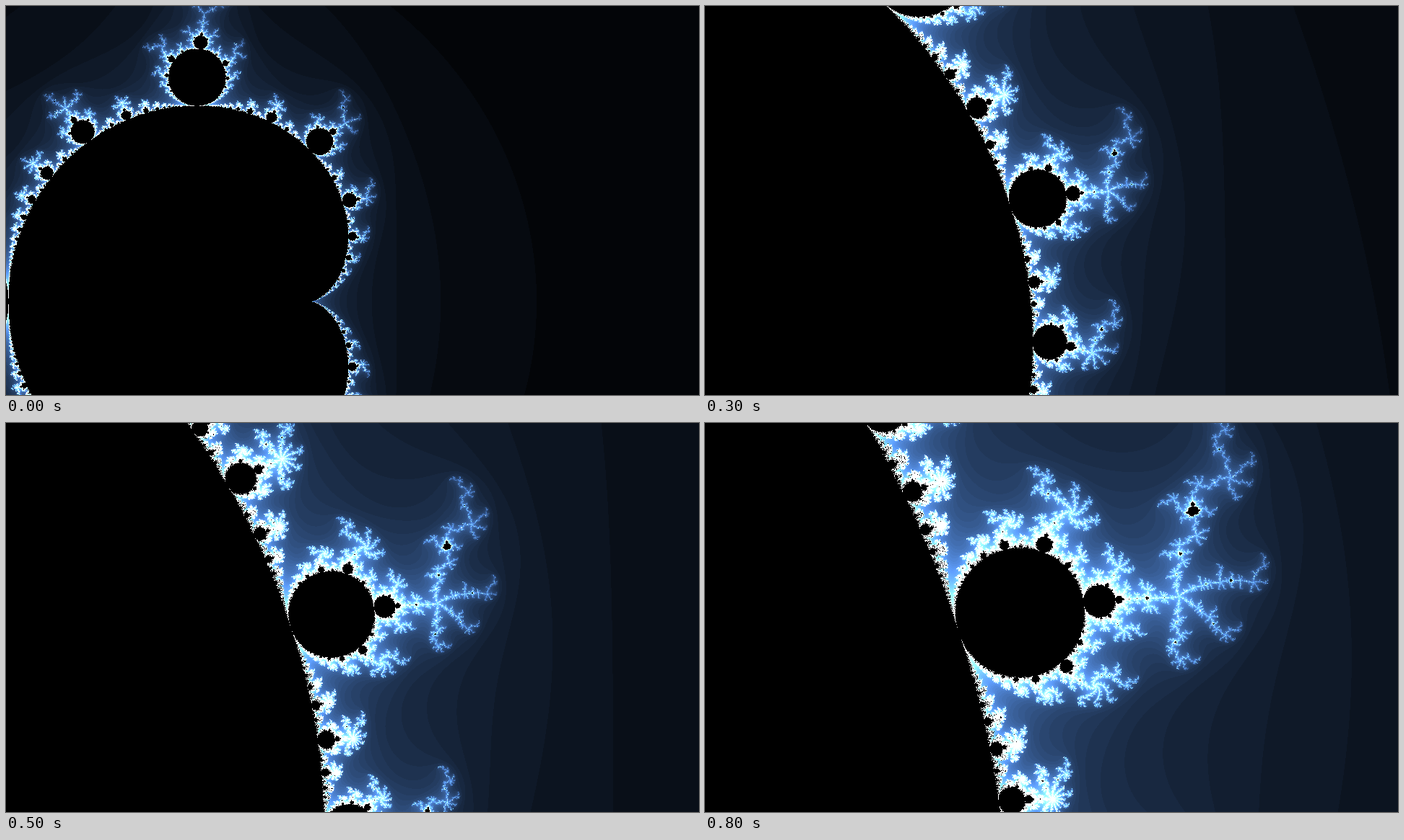
Write an HTML page with a canvas that moves like this. It is 960 by 540 pixels and loops after 900 ms.

```html
<!DOCTYPE html>
<html lang="en">
<head>
<meta charset="utf-8">
<title>Stepped fractal zoom</title>
<style>
  html, body { margin: 0; width: 100%; height: 100%; overflow: hidden; background: #000; }
  canvas { display: block; width: 960px; height: 540px; }
</style>
</head>
<body>
<canvas id="stage" width="960" height="540"></canvas>
<script>
const W = 960, H = 540;
const STEPS = 9, STEP_MS = 100;
const CENTER = { re: 0.391, im: 0.334 };
const SCALE = 418;        // pixels per unit at magnification 1
const MAX_ITER = 500;

const ctx = document.getElementById('stage').getContext('2d');

// Black inside the set, then dark navy through blue to white.
const packColor = (r, g, b) => (255 << 24) | (b << 16) | (g << 8) | r;
const palette = Uint32Array.from({ length: MAX_ITER + 1 }, (_, k) =>
  k === MAX_ITER
    ? packColor(0, 0, 0)
    : packColor(...[3, 5, 8].map(gain => Math.min(255, k * gain))));

function inMainBodies(x, y) {
  const y2 = y * y, d = x - 0.25, q = d * d + y2;
  return q * (q + d) <= 0.25 * y2 || (x + 1) * (x + 1) + y2 <= 0.0625;
}

function escapeTime(cx, cy) {
  if (inMainBodies(cx, cy)) return MAX_ITER;
  let x = cx, y = cy;
  for (let k = 0; k < MAX_ITER; k++) {
    const x2 = x * x, y2 = y * y;
    if (x2 + y2 > 4) return k;
    y = 2 * x * y + cy;
    x = x2 - y2 + cx;
  }
  return MAX_ITER;
}

function renderZoom(zoom) {
  const image = ctx.createImageData(W, H);
  const pixels = new Uint32Array(image.data.buffer);
  const unit = 1 / (SCALE * zoom);
  let i = 0;
  for (let py = 0; py < H; py++) {
    const cy = CENTER.im - (py - H / 2) * unit;
    for (let px = 0; px < W; px++) {
      pixels[i++] = palette[escapeTime(CENTER.re + (px - W / 2) * unit, cy)];
    }
  }
  return image;
}

// Magnification grows by one whole unit per step.
const views = Array.from({ length: STEPS }, (_, step) => renderZoom(step + 1));

const start = performance.now();
let shown = -1;

function draw() {
  const elapsed = Math.max(0, performance.now() - start);
  const step = Math.floor(elapsed / STEP_MS) % STEPS;
  if (step !== shown) {
    ctx.putImageData(views[step], 0, 0);
    shown = step;
  }
  requestAnimationFrame(draw);
}
draw();
</script>
</body>
</html>
```
